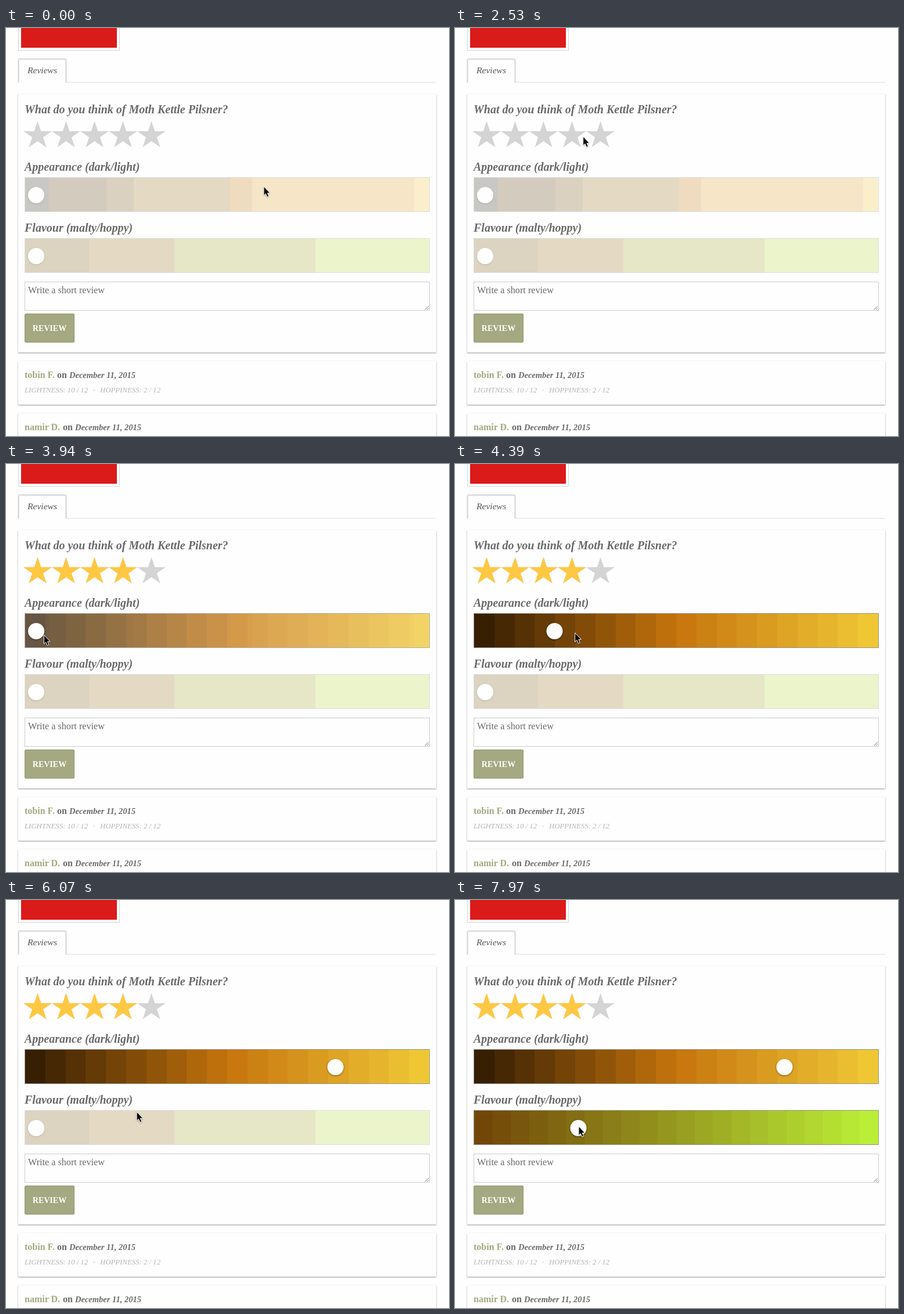
Animation of 763x703 px, one loop 8000 ms. Source, as an HTML page:

```html
<!DOCTYPE html>
<html lang="en">
<head>
<meta charset="utf-8">
<title>Review form</title>
<style>
  html, body { margin: 0; width: 100%; height: 100%; overflow: hidden; background: #fefefe; }
  svg { display: block; }
  text { font-family: "Liberation Serif", "Times New Roman", serif; fill: #6a6a6a; }
  .head { font: italic bold 20px "Liberation Serif", serif; }
  .bold { font-weight: bold; font-size: 16px; }
  .name { fill: #a5a97f; }
  .date { font: italic bold 14.5px "Liberation Serif", serif; }
  .meta { font: italic 12.8px "Liberation Serif", serif; fill: #b4b4b4; }
  .card { fill: #fefefe; filter: drop-shadow(0 1px 1.3px rgba(0,0,0,.42)); }
  .line { fill: none; stroke: #ccc; }
</style>
</head>
<body>
<svg width="763" height="703" viewBox="0 0 763 703">
  <rect x="21.5" y="-9.5" width="174" height="48" fill="#fff" stroke="#d2d2d2"/>
  <rect x="26" y="0" width="165" height="34" fill="#db1b1a"/>

  <path class="line" d="M104 93.5H741" style="stroke:#e2e2e2"/>
  <path class="line" d="M21.5 94V55.5q0-2 2-2H101.5q2 0 2 2V94" style="filter:drop-shadow(0 0 1px rgba(0,0,0,.25))"/>
  <text x="37" y="78" style="font-size:15.6px;font-style:italic;fill:#555">Reviews</text>

  <rect class="card" x="21" y="114" width="720" height="445" rx="1"/>
  <rect class="card" x="21" y="574" width="720" height="75" rx="1"/>
  <rect class="card" x="21" y="664" width="720" height="75" rx="1"/>

  <text class="head" x="32" y="147">What do you think of Moth Kettle Pilsner?</text>
  <text class="head" x="32" y="246">Appearance (dark/light)</text>
  <text class="head" x="32" y="351">Flavour (malty/hoppy)</text>
  <g id="stars"></g>
  <g id="bars"></g>

  <rect class="line" x="32.5" y="437.5" width="697" height="49"/>
  <path d="M721.5 485.5l6.5-6.5M725 485.5l3-3" stroke="#777" fill="none"/>
  <text x="38" y="457" style="font-size:16.2px">Write a short review</text>
  <rect x="32.5" y="492.5" width="85" height="49" rx="1.5" fill="#a5a981" stroke="#91966d"/>
  <text x="75" y="522" text-anchor="middle" style="font-size:14px;font-weight:bold;fill:#fff">REVIEW</text>

  <text class="bold name" x="32" y="603">tobin F.</text>
  <text class="bold" x="88" y="603">on</text>
  <text class="date" x="109" y="603">December 11, 2015</text>
  <text class="meta" x="32" y="628">LIGHTNESS: 10 / 12</text>
  <text class="meta" x="150" y="628">·</text>
  <text class="meta" x="162" y="628">HOPPINESS: 2 / 12</text>
  <text class="bold name" x="32" y="693">namir D.</text>
  <text class="bold" x="98" y="693">on</text>
  <text class="date" x="119" y="693">December 11, 2015</text>

  <path id="cursor" d="M0-1V14.5L3.3 11.4L5.9 17.2L8.7 16L6.2 10.4H10.8Z" stroke="#fff"
    style="filter:drop-shadow(0 1px 1px rgba(0,0,0,.3))"/>
</svg>
<script>
const LOOP = 8000, STEP = 89, LEFT = 33, RIGHT = 729, REST = 52;
const $ = id => document.getElementById(id);
const clamp = v => Math.max(0, Math.min(1, v));

function add(parent, tag, attrs) {
  const el = document.createElementNS("http://www.w3.org/2000/svg", tag);
  for (const k in attrs) el.setAttribute(k, attrs[k]);
  return parent.appendChild(el);
}

function stars(count, fill) {
  const g = add($("stars"), "g", { fill });
  for (let n = 0; n < count; n++) {
    const pts = [];
    for (let i = 0; i < 10; i++) {
      const r = i % 2 ? 0.382 : 1, a = i * Math.PI / 5;
      pts.push(54.5 + 49 * n + 25.8 * r * Math.sin(a), 185.4 - 24.9 * r * Math.cos(a));
    }
    add(g, "polygon", { points: pts.map(v => v.toFixed(2)).join(" ") });
  }
  return g;
}

// Flat colour bands, each [left edge, colour], inside a thin frame
function bands(y, list, border) {
  const g = add($("bars"), "g", {});
  for (const [x, fill] of list)
    add(g, "rect", { x, y, width: RIGHT + 1 - x, height: 60, fill });
  add(g, "rect", { x: 32.5, y: y + .5, width: 697, height: 59, fill: "none", stroke: border });
  return g;
}

// Cuts a gradient into equal bands
function ramp(stops, count) {
  return Array.from({ length: count }, (_, n) => {
    const p = (n + .5) / count * (stops.length - 1), i = Math.floor(p);
    const mix = stops[i].map((c, k) => Math.round(c + (stops[i + 1][k] - c) * (p - i)));
    return [Math.round(LEFT + (RIGHT - LEFT) * n / count), `rgb(${mix})`];
  });
}

function slider(y, pale, vivid) {
  bands(y, pale, "#dedede");
  const top = bands(y, vivid, "#94948a");
  const knob = add($("bars"), "circle", { cy: y + 31, r: 14, fill: "#fff" });
  return (x, on) => {
    top.setAttribute("opacity", on);
    knob.setAttribute("cx", x);
    knob.style.filter = `drop-shadow(0 1px 1.5px rgba(0,0,0,${.13 + .35 * on}))`;
  };
}

stars(5, "#d4d4d4");
const gold = stars(4, "#ffc843");
const setLook = slider(257,
  [[LEFT, "#c9c7c4"], [74, "#d4cbbf"], [173, "#dbd1c0"], [220, "#e4d9c3"], [386, "#efdcc0"], [424, "#f6e6c8"], [703, "#faefca"]],
  ramp([[47, 26, 2], [198, 116, 13], [241, 203, 55]], 20));
const setTaste = slider(362,
  [[LEFT, "#dcd3c1"], [143, "#e4d9c3"], [290, "#e5e7c7"], [533, "#ecf4cc"]],
  ramp([[112, 66, 7], [189, 243, 56]], 22));

// Pointer moves: start, end, target x, y, easing power
const start = [444, 274];
const moves = [
  [900, 1350, 86, 192, 1],
  [1440, 1640, 190, 190, 1],
  [1730, 2000, 305, 188, 1],
  [2180, 2700, 187, 188, 1],
  [3320, 3670, 45, 296, 2],
  [3850, 4210, 172, 293, 2],
  [4390, 5190, 518, 282, 1],
  [5280, 5370, 568, 288, 1],
  [5460, 5540, 558, 303, 1],
  [5720, 6250, 92, 391, 1],
  [6520, 6700, 66, 391, 1],
  [7320, 7410, 57, 391, 1],
  [7590, 7875, 213, 391, 2]
];

// Whole screen refreshes since a; the small slack absorbs uneven timing
const ticks = (t, a, step = STEP) => Math.floor((t - a) / step + .1);

function pointer(t) {
  let [x, y] = start;
  for (const [a, b, tx, ty, power] of moves) {
    if (t < a) break;
    const n = Math.round((b - a) / STEP);
    const p = clamp((ticks(t, a, (b - a) / n) + 1) / (n + 1)) ** power;
    x += (tx - x) * p;
    y += (ty - y) * p;
  }
  return [x, y];
}

const fade = (t, a) => clamp((ticks(t, a) + 1) / 3);

// A dragged knob trails the pointer by one refresh
const drag = (t, grab, drop) => t < grab ? REST : Math.max(REST, pointer(Math.min(t, drop) - STEP)[0] - .5);

function draw() {
  const t = performance.now() % LOOP;
  const [x, y] = pointer(t);
  $("cursor").setAttribute("transform", `translate(${x.toFixed(1)} ${y.toFixed(1)})`);
  gold.setAttribute("opacity", fade(t, 2880));
  setLook(drag(t, 4030, 5460), fade(t, 3850));
  setTaste(drag(t, 7685, LOOP), fade(t, 7590));
  requestAnimationFrame(draw);
}
draw();
</script>
</body>
</html>
```
